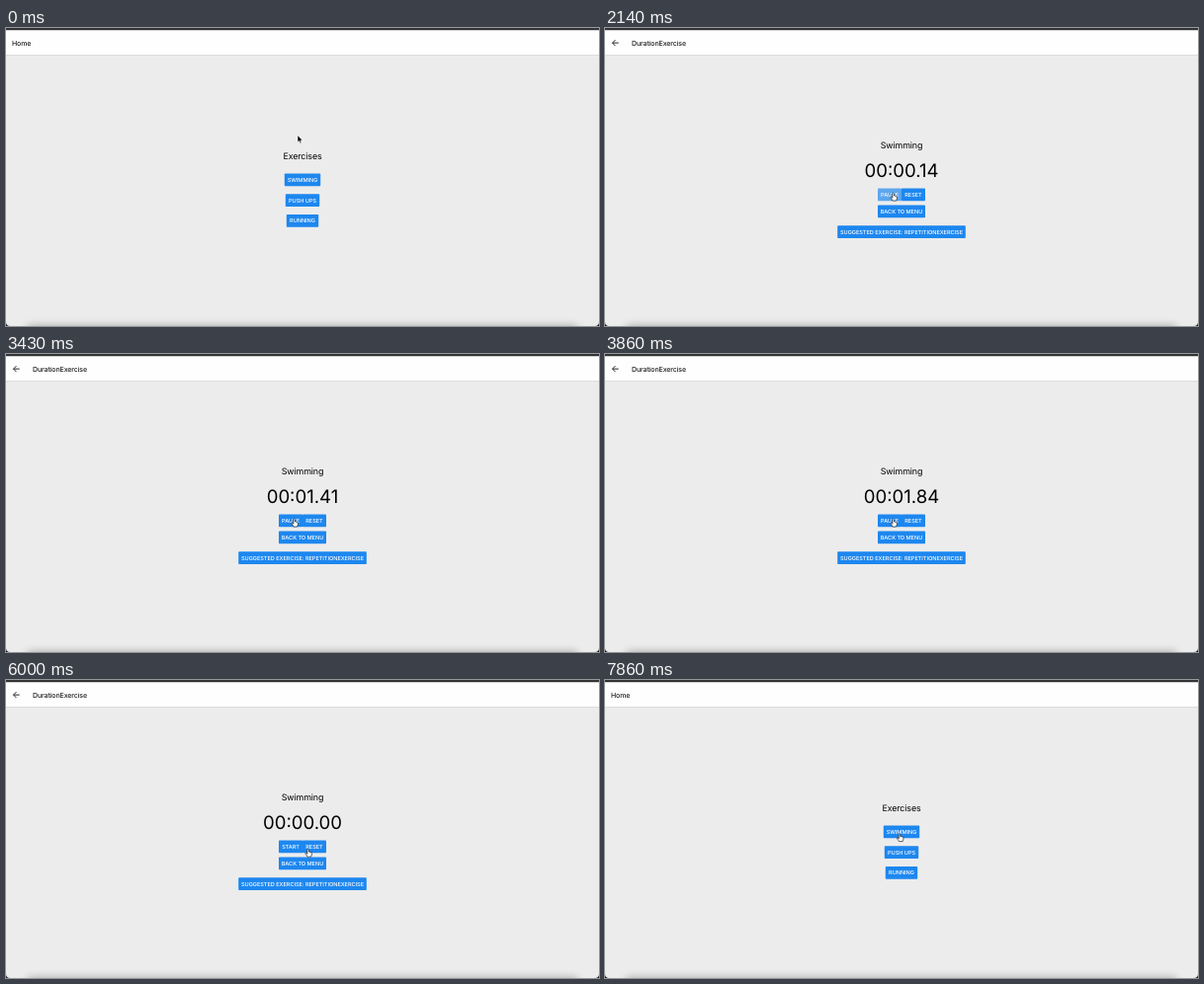
These frames come from a looping animation (600x302 px, 8 s). An HTML page:

```html
<!DOCTYPE html>
<html lang="en">
<head>
<meta charset="utf-8">
<title>Exercise timer</title>
<style>
  html, body { margin: 0; width: 100%; height: 100%; overflow: hidden; background: #ececec; }
  svg { display: block; width: 100%; height: 100%; }
  text { font-family: Inter, "Liberation Sans", sans-serif; text-rendering: geometricPrecision; }
  .bar { font-size: 7px; font-weight: 500; letter-spacing: -.12px; fill: #1c1c1e; }
  .title { font-size: 8.9px; letter-spacing: -.12px; text-anchor: middle; }
  .clock { font-size: 18.6px; text-anchor: middle; }
  .btn rect { fill: #1d87ef; }
  .btn text { font-size: 5.6px; font-weight: 500; letter-spacing: -.04px; text-anchor: middle; fill: #fff; }
</style>
</head>
<body>
<svg id="stage" viewBox="0 0 600 302">
  <defs>
    <filter id="soft" x="-10%" y="-300%" width="120%" height="700%">
      <feGaussianBlur stdDeviation="4.5"/>
    </filter>
  </defs>
  <rect width="600" height="302" fill="#ececec"/>
  <rect x="22" y="302" width="556" height="14" fill="#000" opacity=".32" filter="url(#soft)"/>
  <rect y="2" width="600" height="25" fill="#fefefe"/>
  <rect y="27" width="600" height=".7" fill="#d6d6d6"/>
  <rect width="600" height="2.2" fill="#343336"/>
  <path d="M0 298Q0 302 4 302H0ZM600 298Q600 302 596 302H600Z" fill="#111"/>

  <g id="home">
    <text class="bar" x="6" y="17.7">Home</text>
    <text class="title" x="300" y="133.3">Exercises</text>
  </g>
  <g id="exercise">
    <path d="M13.7 15.1H7.6M10.5 12.1L7.5 15.1L10.5 18.1" fill="none" stroke="#1c1c1e" stroke-width=".95"/>
    <text class="bar" x="27" y="17.7">DurationExercise</text>
    <text class="title" x="300" y="121.9">Swimming</text>
    <text class="clock" id="clock" x="300" y="150.6">00:00.00</text>
  </g>

  <g id="cursor" stroke-linejoin="round" stroke-linecap="round">
    <path id="arrow" d="M0 0V7L1.6 5.6L2.7 8.1L4 7.5L2.9 5.1H5Z" fill="#000" stroke="#fff" stroke-width=".6"/>
    <path id="hand" d="M-.8 .6Q0 -.4 .7 .6V3Q1.3 2.5 1.8 3.2Q2.4 2.8 2.9 3.5Q3.6 3.2 3.9 4V5.6Q3.6 6.8 3.2 8H-.6Q-1.2 6.6 -2.5 5.1Q-2.9 4 -1.9 4.1L-.8 5Z" fill="#fff" stroke="#111" stroke-width=".65"/>
    <path id="beam" d="M-1.2 -3.2Q0 -3.2 0 -2.4Q0 -3.2 1.2 -3.2M0 -2.4V2.8M-1.2 3.6Q0 3.6 0 2.8Q0 3.6 1.2 3.6M-.6 .9H.6" fill="none" stroke="#222" stroke-width=".65"/>
  </g>
</svg>
<script>
const LOOP = 8000, STEP = 1000 / 7;
const START = 2000, PAUSE = 4270, RESET = 4950, OPEN = 930, BACK = 7600;

const $ = id => document.getElementById(id);
const pages = { home: $('home'), exercise: $('exercise') };
const buttons = [];

function node(name, attrs, parent) {
  const el = document.createElementNS('http://www.w3.org/2000/svg', name);
  for (const key in attrs) el.setAttribute(key, attrs[key]);
  return parent.appendChild(el);
}

// press is an optional [down, up] pair of times
function button(page, label, x, y, w, press) {
  const group = node('g', { class: 'btn' }, pages[page]);
  node('rect', { x, y, width: w, height: 12.8, rx: .8 }, group);
  const text = node('text', { x: x + w / 2, y: y + 8.4 }, group);
  text.textContent = label;
  const item = { page, x, y, w, press, group, text };
  buttons.push(item);
  return item;
}

button('home', 'SWIMMING', 281.8, 147.4, 36.4, [520, OPEN]);
button('home', 'PUSH UPS', 282.8, 168.2, 34.4);
button('home', 'RUNNING', 283.8, 189, 32.4);
const toggle = button('exercise', 'START', 276, 162.5, 24.2, [1900, START]);
toggle.second = [4150, PAUSE];
button('exercise', 'RESET', 300, 162.5, 24, [4780, RESET]);
button('exercise', 'BACK TO MENU', 276, 179.4, 48, [7350, BACK]);
button('exercise', 'SUGGESTED EXERCISE: REPETITIONEXERCISE', 235.2, 200.2, 129.6);

// pointer stops: time, x, y
const path = [
  [0, 295, 108.8], [90, 295, 108.8], [560, 297, 153.4], [1480, 297, 153.4],
  [1850, 291.5, 167], [4450, 291.5, 167], [4750, 314.5, 166.6], [5480, 314.5, 166.6],
  [6750, 290, 179], [7000, 290, 179], [7250, 291, 182], [7600, 291, 182],
  [7850, 298, 155.6], [LOOP, 298, 155.6]
];

const ease = p => { p = Math.min(1, Math.max(0, p)); return p * p * (3 - 2 * p); };

function pointer(t) {
  const i = path.findIndex(stop => stop[0] > t);
  const [t0, x0, y0] = path[i - 1], [t1, x1, y1] = path[i];
  const p = ease((t - t0) / (t1 - t0));
  return [x0 + (x1 - x0) * p, y0 + (y1 - y0) * p];
}

function fade(t, press) {
  if (!press) return 1;
  const [down, up] = press;
  return 1 - .8 * (ease((t - down) / 100) - ease((t - up) / 250));
}

function clockText(t) {
  const on = t >= START && t < RESET;
  const cs = on ? Math.floor((Math.min(t, PAUSE) - START) * .0993) : 0;
  const pad = n => String(n).padStart(2, '0');
  return `00:${pad(Math.floor(cs / 100))}.${pad(cs % 100)}`;
}

const show = (el, on) => el.setAttribute('display', on ? 'inline' : 'none');
const inside = (x, y, l, t, w, h) => x >= l && x <= l + w && y >= t && y <= t + h;

function draw(t) {
  const page = t < OPEN || t >= BACK ? 'home' : 'exercise';
  for (const name in pages) show(pages[name], name === page);

  $('clock').textContent = clockText(t);
  toggle.text.textContent = t >= START && t < PAUSE ? 'PAUSE' : 'START';
  for (const b of buttons) b.group.setAttribute('opacity', fade(t, b.press) * fade(t, b.second));

  const [x, y] = pointer(t);
  const onButton = buttons.some(b => b.page === page && inside(x, y, b.x, b.y, b.w, 12.8));
  const onText = page === 'home' ? inside(x, y, 281, 124, 38, 12) : inside(x, y, 261, 133, 78, 23);
  $('cursor').setAttribute('transform', `translate(${x} ${y})`);
  show($('hand'), onButton);
  show($('beam'), !onButton && onText);
  show($('arrow'), !onButton && !onText);
}

const begin = performance.now();
function tick() {
  const t = (performance.now() - begin) % LOOP;
  draw(Math.floor((t + 5) / STEP) * STEP % LOOP);
  requestAnimationFrame(tick);
}
draw(0);
requestAnimationFrame(tick);
</script>
</body>
</html>
```
